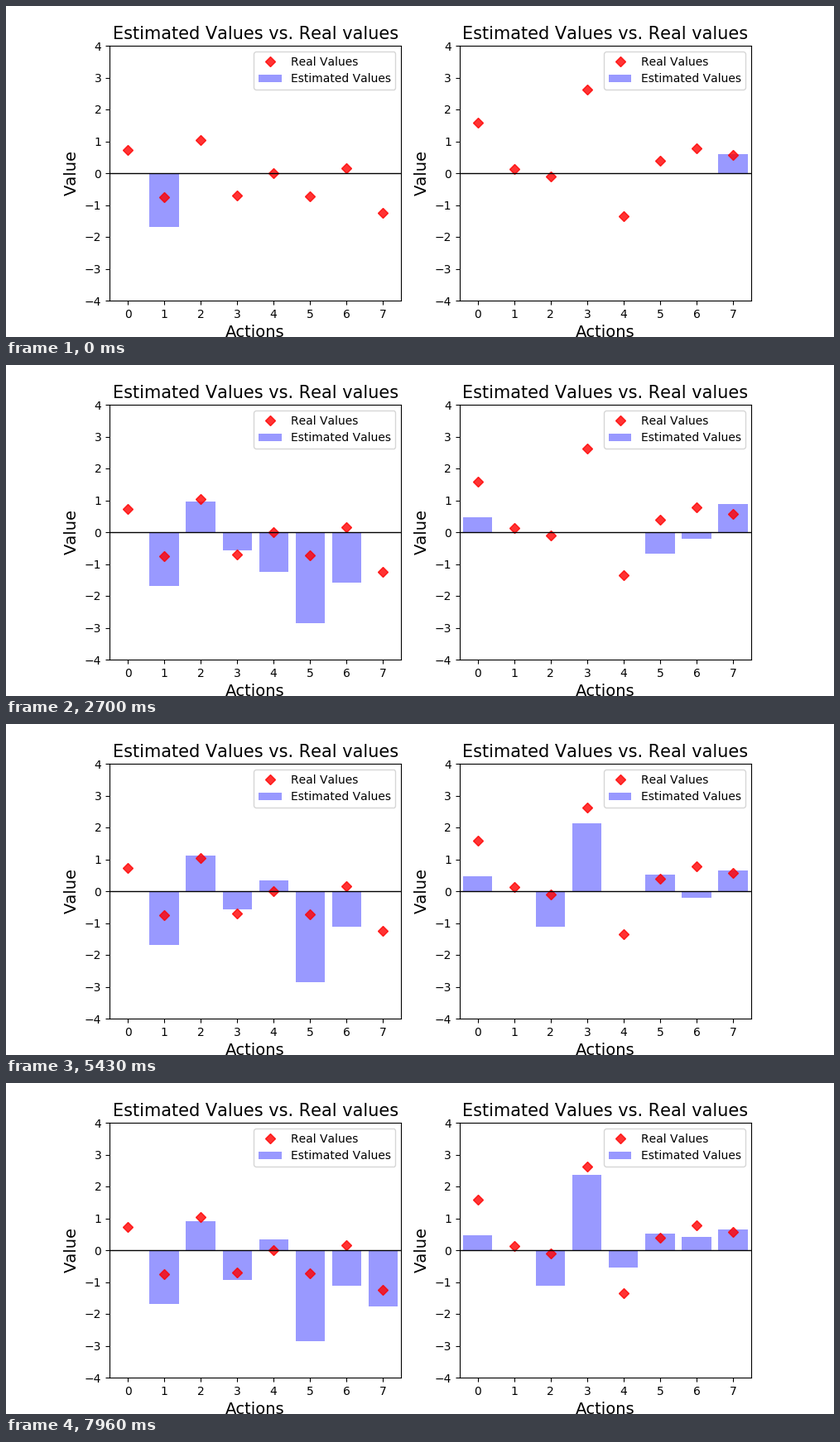
Animation of 1000x400 px, one loop 8000 ms. Source, as a matplotlib script:

```python
import numpy as np
import matplotlib.pyplot as plt
from matplotlib.animation import FuncAnimation

plt.rcParams["text.kerning_factor"] = 6

LOOP, TICK = 8000, 40
ACTIONS = np.arange(8)

# Steps are 100 ms apart, apart from a few short ones
gaps = np.full(83, 100)
gaps[[49, 68, 69, 82]] = 30
gaps[70] = 40
STEP_TIMES = np.concatenate([[0], np.cumsum(gaps)])


def spaced(start, gap, pulls):
    """Put (action, estimate) pulls at an even pace; None changes nothing."""
    return [(int(start + gap * k), *pull)
            for k, pull in enumerate(pulls) if pull]


# "drift" holds key points (step, estimate) of the arms pulled greedily
LEFT = dict(
    real=[0.73, -0.75, 1.04, -0.70, 0.0, -0.73, 0.16, -1.25],
    pulls=spaced(0, 2, [(1, -1.69), (5, -2.85), (3, -0.56), (4, -0.86),
                        (6, -1.58)])
    + spaced(14.4, 7.6, [(4, -1.25), None, None, (4, -0.40), (4, 0.35),
                         (6, -1.11), (3, -1.27), (7, -1.77), (3, -0.93)]),
    drift={0: [(3, 0.65), (6, 0)],
           2: [(10, 1.95), (18, 1.0), (27, 0.95), (36, 1.12), (60, 1.10),
               (83, 0.92)]},
)
RIGHT = dict(
    real=[1.58, 0.13, -0.10, 2.62, -1.35, 0.39, 0.78, 0.57],
    pulls=spaced(4.2, 9.6, [(6, -0.20), (5, -0.67), (0, 0.47), (2, -1.11),
                            None, (5, 0.51), None, (4, -0.55), (6, 0.42)]),
    drift={3: [(53, 2.93), (54, 2.18), (60, 1.85), (74, 2.36)],
           7: [(0, 0.60), (9, 1.09), (37, 0.76), (51, 0.65)]},
)


def estimates(agent, step):
    vals = np.zeros(len(ACTIONS))
    for start, action, value in agent["pulls"]:
        if step >= start:
            vals[action] = value
    for action, points in agent["drift"].items():
        vals[action] = np.interp(step, *zip(*points), left=0)
    return vals


def make_panel(ax, agent):
    ax.plot(ACTIONS, agent["real"], "D", color="red", alpha=0.8,
            label="Real Values")
    bars = ax.bar(ACTIONS, np.zeros(8), width=0.8, color="blue", alpha=0.4,
                  label="Estimated Values")
    ax.axhline(0, color="black", lw=1)
    ax.set(xlim=(-0.5, 7.5), ylim=(-4, 4), xticks=ACTIONS)
    ax.set_title("Estimated Values vs. Real values", fontsize=15)
    ax.set_xlabel("Actions", fontsize=14)
    ax.set_ylabel("Value", fontsize=14)
    ax.legend(loc="upper right")
    return bars


fig, axes = plt.subplots(1, 2, figsize=(10, 4), dpi=100)
panels = [(make_panel(ax, agent), agent)
          for ax, agent in zip(axes, (LEFT, RIGHT))]


def update(i):
    # Look slightly ahead so steps that fall inside a tick show in time
    t = i * TICK + 30
    step = np.searchsorted(STEP_TIMES, t, side="right") - 1
    drawn = []
    for bars, agent in panels:
        for bar, value in zip(bars, estimates(agent, step)):
            bar.set_height(value)
            drawn.append(bar)
    return drawn


anim = FuncAnimation(fig, update, frames=LOOP // TICK, interval=TICK,
                     init_func=lambda: update(0), repeat=True, repeat_delay=0)
plt.show()
```
